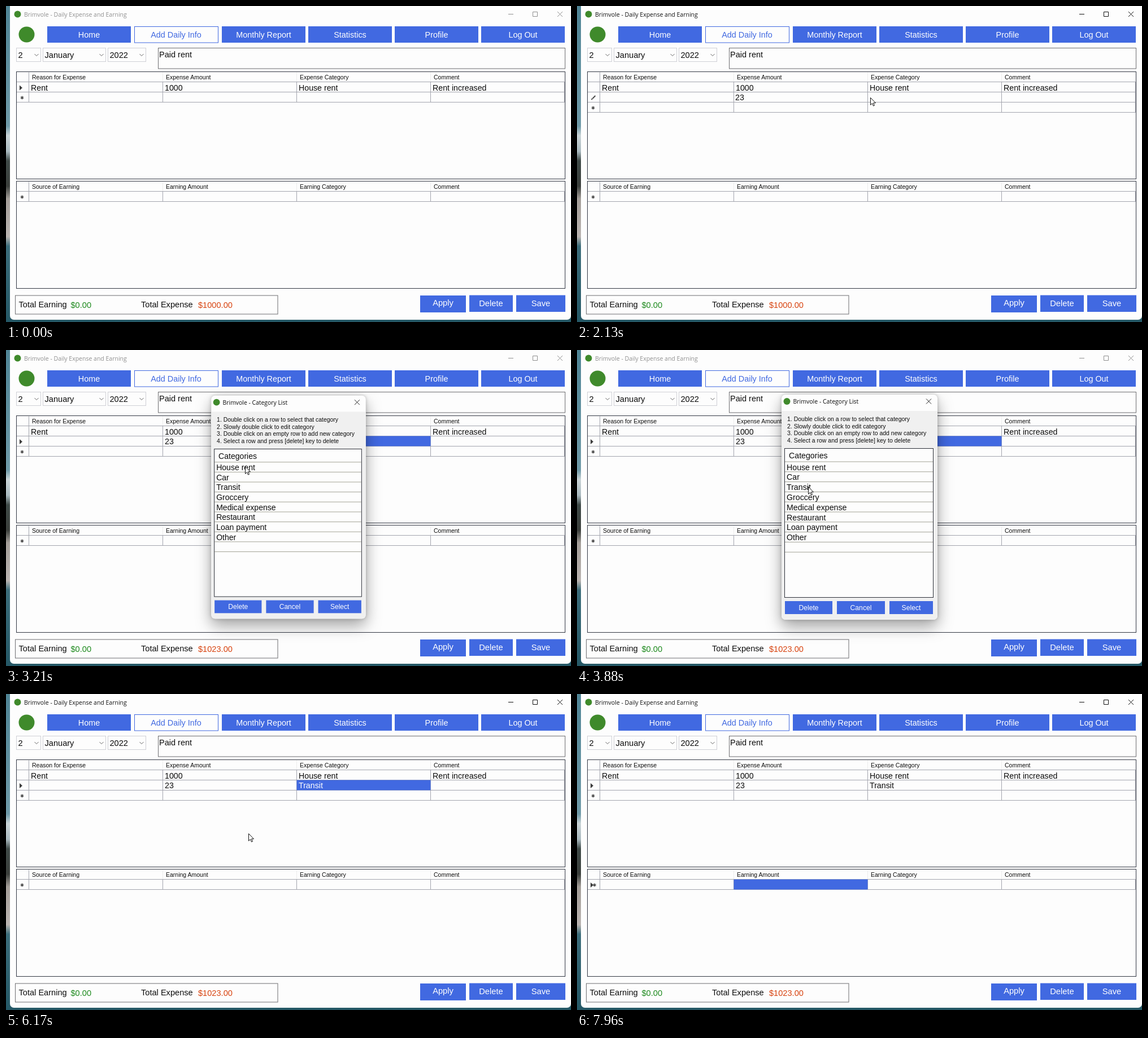
An HTML page that plays this animation: 1000x560 px, repeating every 8000 ms.

```html
<!DOCTYPE html>
<html lang="en">
<head>
<meta charset="utf-8">
<title>Daily Expense and Earning</title>
<style>
  html, body { margin: 0; width: 100%; height: 100%; overflow: hidden; background: #fdfdfd; }
  svg { display: block; width: 1000px; height: 560px; }
  text { font-family: "Liberation Sans", Arial, sans-serif; white-space: pre; }
  .ui { font-family: "Open Sans", "Noto Sans", sans-serif; }
  #dialog { transform-origin: 500px 278.5px; }
  .box { filter: drop-shadow(0 12px 14px rgba(0, 0, 0, .3)) drop-shadow(0 0 3px rgba(0, 0, 0, .25)); }
</style>
</head>
<body>
<svg id="stage" viewBox="0 0 1000 560" xmlns="http://www.w3.org/2000/svg"></svg>
<script>
const LOOP = 8000;
const BRAND = 'Brimvole';
const BLUE = '#4169e1', PAPER = '#fdfdfd', INK = '#0c0c0c', GREEN = '#3f8a2b';

// Moments of the session, in ms
const CLICK_AMOUNT = 1130, TYPE_1 = 1290, TYPE_2 = 1500, CLICK_CATEGORY = 2500,
  OPEN = 3000, CLICK_TRANSIT = 4500, EDIT = 5250, EDIT_END = 5500, POINTER_BACK = 5670,
  CLOSE = 5960, CLICK_EARNING = 7920;

const text = (x, y, str, size = 14.3, fill = INK, more = '') =>
  `<text x="${x}" y="${y}" font-size="${size}" fill="${fill}" ${more}>${str}</text>`;
const rect = (x1, y1, x2, y2, fill, stroke = 'none', more = '') =>
  `<rect x="${x1}" y="${y1}" width="${x2 - x1}" height="${y2 - y1}" fill="${fill}" stroke="${stroke}" ${more}/>`;
const path = (d, stroke, width = 1, fill = 'none') =>
  `<path d="${d}" stroke="${stroke}" stroke-width="${width}" fill="${fill}"/>`;
const during = (from, to, ...parts) =>
  `<g data-from="${from}" data-to="${to}">${parts.join('')}</g>`;
const button = (x1, y1, x2, y2, label, base, size) =>
  rect(x1, y1, x2, y2, BLUE) +
  text((x1 + x2) / 2, base, label, size, '#fff', 'text-anchor="middle"');
const dot = (x, y, r) => `<circle cx="${x}" cy="${y}" r="${r}" fill="${GREEN}"/>`;

const COLS = [40.5, 277.5, 514.5, 751.5, 988.5];
const GRID_LINE = '#a3a5ae';

const marker = y => path(`M24 ${y - 4.5}v9l5-4.5z`, 'none', 0, '#3c3c3c');
const star = (y, x = 28.5) =>
  path(`M${x} ${y - 3}v6M${x - 2.6} ${y - 1.5}l5.2 3M${x - 2.6} ${y + 1.5}l5.2 -3`, '#333', 1.2);
const pencil = y => path(`M25 ${y + 3.5}l2.5 -.8M27.5 ${y + 2}l5 -5`, '#444', 1.8);

function rowLines(top) {
  const uprights = COLS.map(x => `M${x} ${top}v18`).join('');
  return path(`M19 ${top + 18}H988.5${uprights}`, GRID_LINE);
}

function grid(top, bottom, heads) {
  const line = top + 18;
  return rect(18.5, top, 989.5, bottom, PAPER, '#333844') +
    path(COLS.slice(1, 4).map(x => `M${x} ${top + 1}v17`).join(''), '#ececec') +
    path(`M40.5 ${top + 1}v18M19 ${line}H988.5`, GRID_LINE) +
    heads.map((h, i) => text(COLS[i] + 5.5, top + 13.5, h, 10.5)).join('') +
    rowLines(line);
}

const cell = (col, top, from, to) =>
  during(from, to, rect(COLS[col], top, COLS[col + 1], top + 18, BLUE));

function desktop() {
  const stops = [[0, '#4f8495'], [38, '#6f9aa8'], [41, '#c9d3d6'], [46, '#a9b9bf'], [49, '#3f4a48'],
    [57, '#3b3f3c'], [61, '#a39d98'], [73, '#b9b3b0'], [76, '#3c6d7b'], [100, '#255866']];
  return `<defs><linearGradient id="sky" x2="0" y2="1">${
    stops.map(([o, c]) => `<stop offset="${o}%" stop-color="${c}"/>`).join('')
  }</linearGradient></defs>` + rect(0, 0, 1000, 560, 'url(#sky)');
}

function frame() {
  const nav = ['Home', 'Add Daily Info', 'Monthly Report', 'Statistics', 'Profile', 'Log Out'];
  const left = [73, 227, 382, 535, 688, 841];
  const title = `${BRAND} - Daily Expense and Earning`;
  const combo = (x1, x2, str) =>
    rect(x1 + .5, 74.5, x2 - .5, 98.5, PAPER, '#cfd0d6') + text(x1 + 3.5, 92, str, 14.6) +
    path(`M${x2 - 11.5} 85l3.5 3.5l3.5 -3.5`, '#666');

  return rect(7, -8, 1000, 556, PAPER, 'none', 'rx="7"') +
    dot(20.5, 14.5, 6) +
    `<g id="caption">${text(32, 18.5, title, 10.5, 'currentColor', 'class="ui"')}${
      path('M889 14.5h9M932.5 10.5h8v8h-8zM976 10l9 9M985 10l-9 9', 'currentColor')}</g>` +
    dot(36.5, 50.5, 14) +
    nav.map((label, i) => {
      const x = left[i], end = x + 148, mid = (x + end) / 2;
      return i === 1
        ? rect(x + .5, 36.5, end + .5, 65, PAPER, BLUE) +
          text(mid, 55.5, label, 14.4, BLUE, 'text-anchor="middle"')
        : button(x, 36, end, 65, label, 55.5, 14.4);
    }).join('') +
    combo(18, 62, '2') + combo(65, 177, 'January') + combo(180, 248, '2022') +
    rect(269.5, 74.5, 989.5, 111, PAPER, '#6d6d70') + text(271, 91, 'Paid rent', 14.5);
}

function expenses() {
  return grid(116.5, 306.5, ['Reason for Expense', 'Expense Amount', 'Expense Category', 'Comment']) +
    ['Rent', '1000', 'House rent', 'Rent increased']
      .map((s, i) => text(COLS[i] + 3.5, 149.5, s, 14.2)).join('') +
    rowLines(152.5) +
    during(TYPE_1, LOOP, rowLines(170.5), star(180.5)) +
    during(0, CLICK_AMOUNT, marker(145), star(162.5)) +
    during(CLICK_AMOUNT, TYPE_1, marker(162.5), star(162.5, 31)) +
    cell(1, 152.5, CLICK_AMOUNT, TYPE_1) +
    during(TYPE_1, CLICK_CATEGORY, pencil(162)) +
    during(TYPE_1, TYPE_2, text(280, 166.8, '2', 14.2)) +
    during(TYPE_2, CLICK_CATEGORY, text(280, 166.8, '23', 14.2)) +
    during(CLICK_CATEGORY, LOOP, marker(162.5), text(281, 167.3, '23', 14.2)) +
    cell(2, 152.5, CLICK_CATEGORY, CLICK_EARNING) +
    during(CLOSE, CLICK_EARNING, text(518, 167.3, 'Transit', 14.2, '#fff')) +
    during(CLICK_EARNING, LOOP, text(518, 167.3, 'Transit', 14.2));
}

function earnings() {
  return grid(310.5, 500.5, ['Source of Earning', 'Earning Amount', 'Earning Category', 'Comment']) +
    during(0, CLICK_EARNING, star(338.5)) +
    during(CLICK_EARNING, LOOP, marker(338.5), star(338.5, 31)) +
    cell(1, 328.5, CLICK_EARNING, LOOP);
}

function footer() {
  const total = str => text(340, 534.7, str, 14.6, '#d8430f');
  return rect(16.5, 513, 481, 546, PAPER, '#6d6d70') +
    text(22.5, 534, 'Total Earning', 14.6) + text(114.5, 535, '$0.00', 14.6, '#1d8a1d') +
    text(239, 534, 'Total Expense', 14.6) +
    during(0, CLICK_CATEGORY, total('$1000.00')) +
    during(CLICK_CATEGORY, LOOP, total('$1023.00')) +
    button(733, 513, 814, 543, 'Apply', 531.3, 14.7) +
    button(820, 512.5, 897, 542, 'Delete', 532.3, 14.7) +
    button(903, 512.5, 990, 542, 'Save', 532.3, 14.7);
}

function dialog() {
  const help = ['Double click on a row to select that category', 'Slowly double click to edit category',
    'Double click on an empty row to add new category', 'Select a row and press [delete] key to delete'];
  const items = ['House rent', 'Car', 'Transit', 'Groccery', 'Medical expense', 'Restaurant',
    'Loan payment', 'Other'];
  const pitch = 17.8;
  const lines = [...Array(10).keys()].map(i => `M368 ${198 + i * pitch}H630`).join('');
  const white = text(371, 212.6 + 2 * pitch, 'Transit', 14.2, '#fff');
  const picked = rect(368, 234, 630, 251.2, BLUE) + white;

  return `<g id="dialog"><g class="box">${rect(362, 79, 638, 478, PAPER, 'none', 'rx="7"')}</g>` +
    `<path d="M362 108H638V471a7 7 0 0 1 -7 7H369a7 7 0 0 1 -7 -7z" fill="#f0f0f0"/>` +
    dot(371.5, 91, 6) +
    text(382.5, 95, `${BRAND} - Category List`, 10.5, INK, 'class="ui"') +
    path('M618 86.5l9 9M627 86.5l-9 9', '#222') +
    help.map((s, i) => text(372, 126 + i * 12.6, `${i + 1}. ${s}`, 10.5)).join('') +
    rect(367.5, 174.5, 630.5, 438.5, PAPER, '#2c2f38') +
    path(lines, '#a2a295') +
    text(375, 191.8, 'Categories', 14.2) +
    items.map((s, i) => text(371, 212.6 + i * pitch, s, 14.2)).join('') +
    during(CLICK_TRANSIT, EDIT, picked) +
    during(EDIT, EDIT_END, rect(370, 235, 412.5, 251, '#0078d7'), white) +
    during(EDIT_END, LOOP, picked) +
    button(368, 445, 452, 468, 'Delete', 460.6, 12.2) +
    button(460, 445, 545, 468, 'Cancel', 460.6, 12.2) +
    button(553, 445, 630, 468, 'Select', 460.6, 12.2) + '</g>';
}

const pointer = `<g id="pointer">${
  during(0, EDIT, ARROW()) + during(POINTER_BACK, LOOP, ARROW()) +
  during(EDIT, POINTER_BACK,
    path('M-2 -5.5h1.5l.5 .5l.5 -.5h1.5M0 -5v10M-2 5.5h1.5l.5 -.5l.5 .5h1.5', '#222'))}</g>`;

function ARROW() {
  return path('M0 0V12.8L3 10L5 14.6L7 13.7L5 9.3H9Z', '#111', 1, '#fff');
}

const stage = document.getElementById('stage');
stage.innerHTML = desktop() + frame() + expenses() + earnings() + footer() + dialog() + pointer;

const byId = id => document.getElementById(id);
const timed = [...stage.querySelectorAll('[data-from]')]
  .map(el => ({ el, from: +el.dataset.from, to: +el.dataset.to }));

const TRACK = [
  [420, 640, 556], [1130, 400, 160], [1700, 400, 162], [2130, 519, 162], [2750, 519, 162],
  [3000, 508, 167], [3210, 423, 206], [3540, 407, 234], [3880, 409, 242], [4670, 410, 241],
  [5090, 426, 246], [6130, 426, 246], [6500, 515, 283], [6670, 540, 292], [7500, 749, 142],
  [7670, 749, 142], [7920, 420, 338]
];
const clamp = v => Math.min(1, Math.max(0, v));

function pointerAt(t) {
  const next = TRACK.findIndex(k => k[0] > t);
  if (next === 0) return TRACK[0].slice(1);
  if (next < 0) return TRACK[TRACK.length - 1].slice(1);
  const [t0, x0, y0] = TRACK[next - 1], [t1, x1, y1] = TRACK[next];
  const p = (t - t0) / (t1 - t0), e = p * p * (3 - 2 * p);
  return [x0 + (x1 - x0) * e, y0 + (y1 - y0) * e];
}

function draw(now) {
  const t = now % LOOP;
  for (const { el, from, to } of timed) {
    el.style.display = t >= from && t < to ? '' : 'none';
  }

  const active = (t >= CLICK_AMOUNT && t < OPEN) || t >= CLOSE;
  byId('caption').style.color = active ? '#111' : '#8f8f8f';

  const enter = clamp((t - OPEN) / 300), leave = clamp((t - CLOSE) / 170);
  const box = byId('dialog').style;
  box.display = enter > 0 && leave < 1 ? '' : 'none';
  box.opacity = clamp(enter * 2) * (1 - leave);
  box.transform = `scale(${1 - .1 * (1 - enter) ** 2 - .08 * leave * leave})`;

  // The pointer hides while typing
  const shown = t >= 420 && t < 7940 && !(t >= TYPE_1 && t < 1700);
  const [x, y] = pointerAt(t).map(Math.round);
  byId('pointer').style.display = shown ? '' : 'none';
  byId('pointer').setAttribute('transform', `translate(${x + .5} ${y + .5})`);
}

const start = performance.now();
function tick() {
  draw(performance.now() - start);
  requestAnimationFrame(tick);
}
tick();
</script>
</body>
</html>
```
